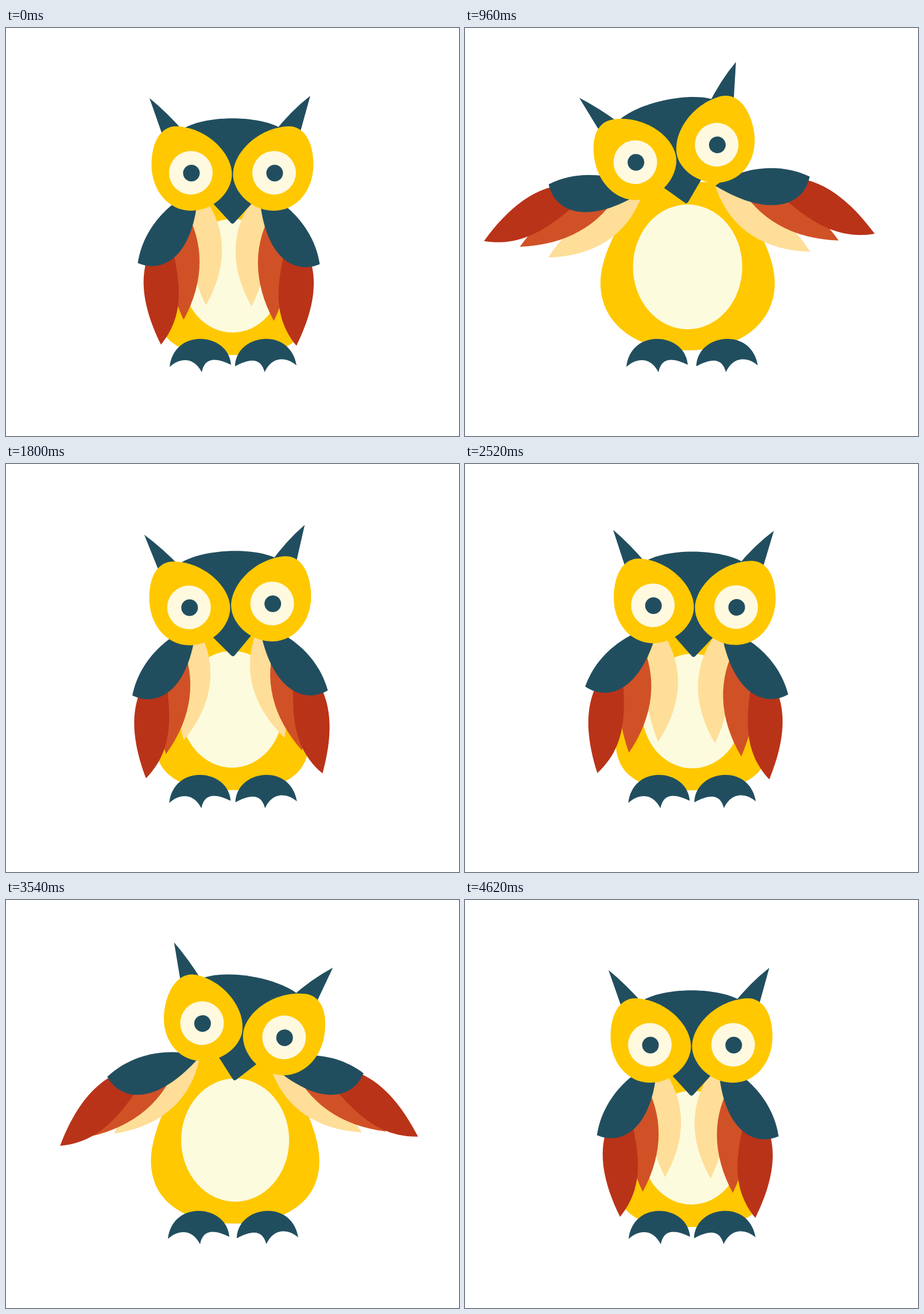
An HTML page with a canvas for the animation above (4680 ms loop, 789 by 710 pixels).

```html
<!DOCTYPE html>
<html lang="en">
<head>
<meta charset="utf-8">
<title>Owl</title>
<style>
  html, body { margin: 0; width: 100%; height: 100%; overflow: hidden; background: #fff; }
  canvas { display: block; }
</style>
</head>
<body>
<canvas id="stage" width="789" height="710"></canvas>
<script>
const ctx = document.getElementById('stage').getContext('2d');
const LOOP = 4680, STEP = 60;
const LEFT = -1, RIGHT = 1;
const NAVY = '#214e5f', YELLOW = '#ffc800', CREAM = '#fff9e0', BELLY = '#fdfbde';
const PALE = '#fede98', ORANGE = '#d15126', RED = '#b93318';

// Two flaps per loop; the head leans away from the wing that leads it
const RISE = 1000, FALL = 1100, FALL_AFTER = 890, FALL_LAG = 90;
const flaps = [
  { start: 60, lean: LEFT, lag: 0 },
  { start: 2320, lean: RIGHT, lag: 80 }
];

const ease = u => (1 - Math.cos(Math.PI * Math.min(Math.max(u, 0), 1))) / 2;
const rad = deg => deg * Math.PI / 180;

// How far a wing is raised, 0 to 1; the right wing trails the left
function raise(t, side) {
  return flaps.reduce((sum, { start, lag }) => {
    const [riseLag, fallLag] = side === RIGHT ? [lag, FALL_LAG] : [0, 0];
    const up = ease((t - start - riseLag) / RISE);
    const down = ease((t - start - FALL_AFTER - fallLag) / FALL);
    return sum + up * (1 - down);
  }, 0);
}

function fill(color, shape) {
  ctx.fillStyle = color;
  ctx.fill(new Path2D(shape));
}

function ellipse(color, x, y, rx, ry = rx) {
  ctx.fillStyle = color;
  ctx.beginPath();
  ctx.ellipse(x, y, rx, ry, 0, 0, 7);
  ctx.fill();
}

function group(x, y, side, deg, draw) {
  ctx.save();
  ctx.translate(x, y);
  ctx.scale(side, 1);
  ctx.rotate(rad(deg));
  draw();
  ctx.restore();
}

// Leaf along the x axis; bulges are given for the inner and outer edge
function feather(color, len, in1, in2, out1, out2) {
  const a = len * .3, b = len * .65;
  fill(color, `M0 0C${a} ${-out1} ${b} ${-out2} ${len} 0C${b} ${in2} ${a} ${in1} 0 0Z`);
}

function drawBody(x, grow, belly) {
  const w = 131 + 21 * grow, wide = 485 - 42 * grow, low = 569 - 8 * grow;
  fill(YELLOW, `M${x} ${low}C${x - w * .58} ${low} ${x - w} ${wide + 73} ${x - w} ${wide}`
    + `C${x - w} ${wide - 54} ${x - w * .72} 325 ${x - 74} 268`
    + `H${x + 74}C${x + w * .72} 325 ${x + w} ${wide - 54} ${x + w} ${wide}`
    + `C${x + w} ${wide + 73} ${x + w * .58} ${low} ${x} ${low}Z`);
  ellipse(BELLY, x, 431 - 16 * belly, 87 + 8.5 * belly, 99 + 10 * belly);
}

// The arm moves first, the feathers follow from the outer to the inner one
function drawWing(t, x, y, side, grow) {
  const arm = 50.4 - 56 * raise(t + 90, side);
  const along = (dist, deg, draw) => group(x + side * dist * Math.cos(rad(arm)),
    y + dist * Math.sin(rad(arm)), side, deg, draw);
  const hang = order => 90 - 3.8 * order - 62 * raise(t + 40 * order, side);
  along(0, hang(-1), () => feather(PALE, 201, 46, 46, 29, 29));
  along(40, hang(0), () => feather(ORANGE, 195 + 6 * grow, 37, 37, 40, 32));
  along(80, hang(1), () => feather(RED, 208 + 10 * grow, 10, 52, 58, 42));
  along(0, arm, () => fill(NAVY, 'M0 0C35-22 105-36 165 0C152 45 95 70 0 0Z'));
}

function drawFoot(side, spread, deg) {
  group(395 + side * (56 + spread), 570, -side, deg, () => fill(NAVY,
    'M-54 20C-51-10-29-29-1-29C29-29 51-10 53 16C26 3 7 3 2 29C-14-2-41 7-54 20Z'));
}

function drawHead() {
  fill(NAVY, 'M-144.5-130Q-114-105-85-72L-120-60Z');
  fill(NAVY, 'M135.5-134Q102-108 72-70L115-60Z');
  fill(NAVY, 'M-95-70C-60-103 60-103 95-70L46 40L3 87Q0 90-3 87L-46 40Z');
  for (const side of [LEFT, RIGHT]) {
    group(0, 0, side, 0, () => {
      fill(YELLOW, 'M98-81C45-79 1-35 1 3C1 32 32 66 72 66C112 66 141 30 141-14C141-52 126-81 98-81Z');
      ellipse(CREAM, 72.5, 0, 38);
    });
    ellipse(NAVY, side * 72.5 + 1, .5, 14.5);
  }
}

function render(t) {
  const { lean } = flaps[t < 2200 ? 0 : 1];
  const lead = ahead => raise(t + ahead, -lean);
  const tilt = 12.4 * lean * lead(0), sway = 27 * lean * lead(90);
  const grow = lead(40), belly = lead(-30);
  const shoulderX = 388 + sway * .55, gap = 53 + 10 * grow;
  const shoulderY = 283 + 16 * grow - 20 * belly, drop = 1 + tilt * .5;

  ctx.fillStyle = '#fff';
  ctx.fillRect(0, 0, 789, 710);
  drawBody(394.5 + sway * .25, grow, belly);
  for (const side of [LEFT, RIGHT]) {
    drawWing(t, shoulderX + side * gap, shoulderY + side * drop, side, grow);
  }
  drawFoot(LEFT, 4 * grow, 0);
  drawFoot(RIGHT, 4 * grow, 3);
  group(394.5 + sway, 252 - 34 * grow, 1, tilt, drawHead);
}

const start = performance.now();
function tick() {
  const t = (performance.now() - start) % LOOP;
  render(Math.floor(t / STEP) * STEP);
  requestAnimationFrame(tick);
}
tick();
</script>
</body>
</html>
```
